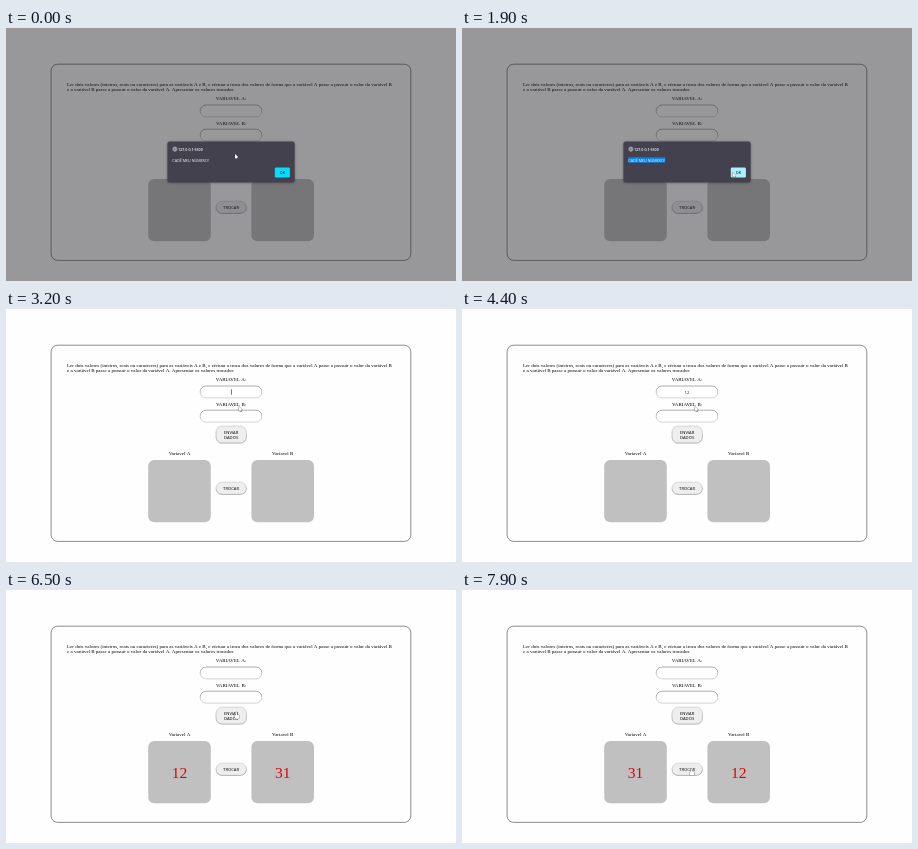
An HTML page with a canvas for the animation above (8000 ms loop, 450 px wide and 253 px high).

```html
<!DOCTYPE html>
<html lang="pt">
<head>
<meta charset="utf-8">
<title>Troca de valores</title>
<style>
html, body { margin: 0; width: 100%; height: 100%; overflow: hidden; background: #fefefe; }
canvas { display: block; width: 450px; height: 253px; }
</style>
</head>
<body>
<canvas id="stage"></canvas>
<script>
const W = 450, H = 253, MID = 225, LOOP = 8000, STEP = 100;
const SERIF = '"Liberation Serif", serif';
const SANS = '"Open Sans", "Noto Sans", sans-serif';
const SEND = 6400, SWAP = 7800, CLOSE = 2000;
const canvas = document.getElementById('stage');
const ctx = canvas.getContext('2d');
const dpr = window.devicePixelRatio || 1;
canvas.width = Math.round(W * dpr);
canvas.height = Math.round(H * dpr);

// Pointer moves; it rests in between
const moves = [
  { from: 0, to: 500, x: 203, y: 132 },
  { from: 500, to: 900, x: 167, y: 132 },
  { from: 1000, to: 1800, x: 270.7, y: 144.6 },
  { from: 2100, to: 2600, x: 226, y: 83 },
  { from: 2800, to: 3000, x: 233, y: 97.6 },
  { from: 4400, to: 4500, x: 232, y: 106.5 },
  { from: 5500, to: 5700, x: 229.6, y: 122 },
  { from: 6600, to: 7200, x: 228.6, y: 178.6 }
];

function pointerAt(t) {
  let x = 229, y = 126;
  for (const m of moves) {
    const k = Math.min(1, Math.max(0, (t - m.from) / (m.to - m.from)));
    x += (m.x - x) * k;
    y += (m.y - y) * k;
  }
  return { x, y };
}

const within = (t, a, b) => t >= a && t < b;

function typed(word, t, start, gap) {
  if (!within(t, start, SEND)) return '';
  return word.slice(0, 1 + Math.floor((t - start) / gap));
}

function roundRect(x, y, w, h, r, fill, stroke, line = 0.6) {
  ctx.beginPath();
  ctx.roundRect(x, y, w, h, r);
  if (fill) { ctx.fillStyle = fill; ctx.fill(); }
  if (stroke) { ctx.strokeStyle = stroke; ctx.lineWidth = line; ctx.stroke(); }
}

// Set large and scaled down, so that small sizes keep their true spacing.
// Returns the width.
function text(str, x, y, size, family, color = '#000', align = 'center', weight = 400) {
  const zoom = 16;
  ctx.save();
  ctx.translate(x, y);
  ctx.scale(1 / zoom, 1 / zoom);
  ctx.font = `${weight} ${size * zoom}px ${family}`;
  ctx.fillStyle = color;
  ctx.textAlign = align;
  ctx.fillText(str, 0, 0);
  const width = ctx.measureText(str).width / zoom;
  ctx.restore();
  return width;
}

const serif = (str, x, y, align) => text(str, x, y, 5, SERIF, '#000', align);

function bevel(x, y, w, h, r, fill, top, bottom) {
  const edge = ctx.createLinearGradient(0, y, 0, y + h);
  edge.addColorStop(0.2, top);
  edge.addColorStop(0.8, bottom);
  roundRect(x, y, w, h, r, fill, edge, 0.65);
}

function input(y, value, caret) {
  bevel(194.2, y, 61.6, 11.9, 5.8, '#fff', '#808080', '#bcbcbc');
  const width = text(value, MID, y + 7.6, 4.17, SANS, '#222');
  if (caret) {
    ctx.fillStyle = '#222';
    ctx.fillRect(MID + width / 2, y + 3.3, 0.6, 5.4);
  }
}

function button(y, h, lines) {
  bevel(210, y, 30.4, h, 6, '#eeeeef', '#c8c8c8', '#8c8c8c');
  lines.forEach((line, i) => {
    const row = i - (lines.length - 1) / 2;
    text(line, MID + 0.1, y + h / 2 + 1.5 + row * 5.2, 4.17, SANS);
  });
}

function tile(x, label, value) {
  serif(label, x, 146.3);
  roundRect(x - 31.3, 151, 62.6, 62.2, 6, '#c0c0c0');
  text(value, x, 187.6, 15.6, SERIF, '#e00000');
}

function page(t) {
  ctx.fillStyle = '#fefefe';
  ctx.fillRect(0, 0, W, H);
  roundRect(45.1, 36.2, 359.7, 196.2, 6.5, null, '#484848', 0.62);
  serif('Ler dois valores (inteiros, reais ou caracteres) para as variáveis A e B, e efetuar a troca dos valores de forma que a variável A passe a possuir o valor da variável B',
    61, 57.6, 'left');
  serif('e a variável B passe a possuir o valor da variável A. Apresentar os valores trocados',
    61, 63.3, 'left');
  serif('VARIAVEL A:', MID, 72.2);
  serif('VARIAVEL B:', MID, 96.6);

  input(77, typed('12', t, 3300, 800), within(t, 2700, 3700));
  input(101.2, typed('31', t, 5200, 200), within(t, 4500, 4800) || within(t, 5200, 5900));
  button(117.1, 17, ['ENVIAR', 'DADOS']);
  button(173.2, 12.2, ['TROCAR']);

  let values = t < SEND ? ['', ''] : ['12', '31'];
  if (t >= SWAP) values = values.reverse();
  tile(173.5, 'Variavel A', values[0]);
  tile(276.7, 'Variavel B', values[1]);
}

function globe(x, y) {
  const r = 2.1;
  ctx.strokeStyle = '#e8e8ee';
  ctx.lineWidth = 0.45;
  ctx.beginPath();
  for (const rx of [r, r * 0.45]) {
    ctx.moveTo(x + rx, y);
    ctx.ellipse(x, y, rx, r, 0, 0, Math.PI * 2);
  }
  ctx.moveTo(x - r, y);
  ctx.lineTo(x + r, y);
  ctx.stroke();
}

function dialog(t, p) {
  ctx.fillStyle = 'rgba(28,27,34,0.45)';
  ctx.fillRect(0, 0, W, H);
  ctx.save();
  ctx.shadowColor = 'rgba(0,0,0,0.3)';
  ctx.shadowBlur = 3 * dpr;
  ctx.shadowOffsetY = 0.6 * dpr;
  roundRect(161.4, 113.6, 127.3, 40.8, 2.5, '#42414d');
  ctx.restore();

  const left = 166.3, right = 203.2, light = '#fbfbfe';
  globe(168.9, 121.1);
  text('127.0.0.1:5500', 172.2, 122.5, 3.6, SANS, light, 'left', 600);
  if (t >= 500) {
    const edge = t < 1000 ? Math.max(left, p.x) : left;
    ctx.fillStyle = '#0a84e8';
    ctx.fillRect(edge, 129.3, right - edge, 5.4);
  }
  text('CADÊ MEU NÚMERO!', left, 133.5, 3.7, SANS, light, 'left');

  const hover = p.x > 269 && p.y > 139;
  const fill = t >= CLOSE - STEP ? '#aaf2ff' : hover ? '#80ebff' : '#00ddff';
  roundRect(268.8, 139.4, 15.1, 10.2, 1.3, fill);
  text('OK', 276.4, 145.9, 3.7, SANS, '#2b2a33', 'center', 600);
}

function outline() {
  ctx.strokeStyle = '#333';
  ctx.fillStyle = '#fff';
  ctx.lineWidth = 0.55;
  ctx.lineJoin = 'round';
  ctx.stroke();
  ctx.fill();
}

function arrow() {
  ctx.beginPath();
  ctx.moveTo(0, 0);
  ctx.lineTo(0, 4.7);
  ctx.lineTo(1.2, 3.7);
  ctx.lineTo(2.2, 5.4);
  ctx.lineTo(2.1, 3.4);
  ctx.lineTo(3.4, 3.3);
  ctx.closePath();
  outline();
}

function hand() {
  ctx.beginPath();
  ctx.roundRect(-0.8, 2.7, 4.4, 4.1, 1.4);
  ctx.roundRect(0.1, 0, 1.2, 4.5, 0.6);
  outline();
}

function beam() {
  ctx.strokeStyle = '#444';
  ctx.lineWidth = 0.5;
  ctx.beginPath();
  for (const y of [-2.6, 2.6]) {
    ctx.moveTo(-1, y);
    ctx.lineTo(1, y);
  }
  ctx.moveTo(0, -2.6);
  ctx.lineTo(0, 2.6);
  ctx.stroke();
}

function pointer(t, p) {
  const overInput = within(t, 2600, 2900) || within(t, 4500, 5600);
  const overButton = within(t, 5700, 6700) || t >= 7100;
  ctx.save();
  ctx.translate(p.x, p.y);
  (overInput ? beam : overButton ? hand : arrow)();
  ctx.restore();
}

function frame(now) {
  const t = Math.floor((now % LOOP) / STEP) * STEP;
  const p = pointerAt(t);
  ctx.setTransform(dpr, 0, 0, dpr, 0, 0);
  page(t);
  if (t < CLOSE) dialog(t, p);
  pointer(t, p);
}

const start = performance.now();
function tick() {
  frame(performance.now() - start);
  requestAnimationFrame(tick);
}
tick();
</script>
</body>
</html>
```
